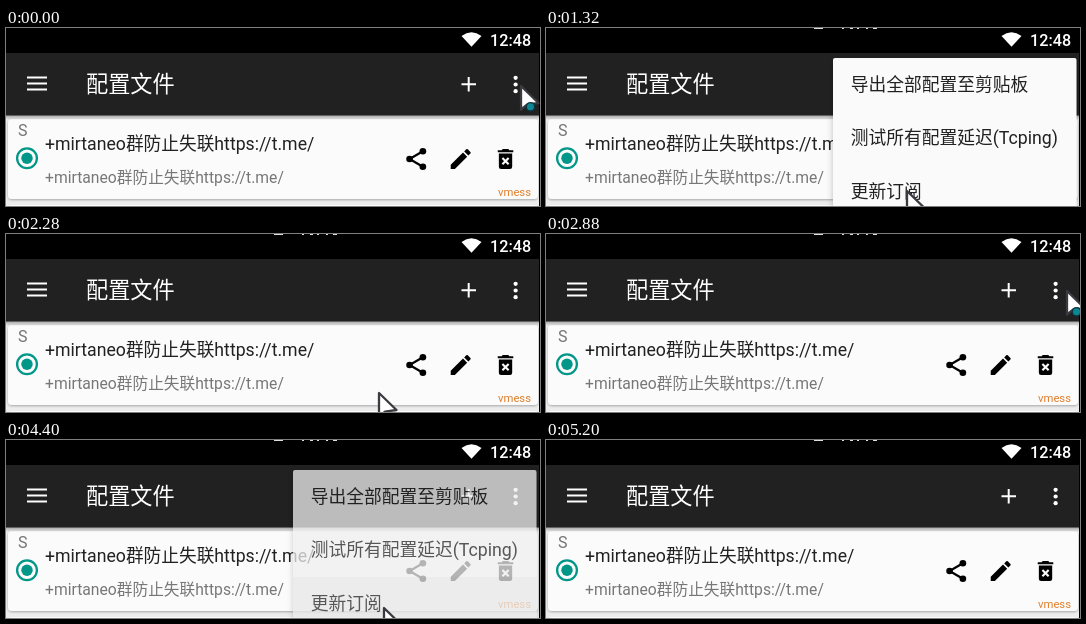
Animation, 534 px wide and 178 px high, one loop 5.64 s. Source, as an HTML page:

```html
<!DOCTYPE html>
<html lang="zh-CN">
<head>
<meta charset="utf-8">
<style>
html, body { margin: 0; width: 100%; height: 100%; overflow: hidden; background: #000; }
svg { display: block; width: 534px; height: 178px; }
text { font-family: Roboto, "Noto Sans CJK SC", "Noto Sans CJK", "Noto Sans CJK JP", sans-serif; white-space: pre; }
</style>
</head>
<body>
<svg viewBox="0 0 534 178" xmlns="http://www.w3.org/2000/svg">
  <defs>
    <linearGradient id="edge" x1="0" y1="0" x2="0" y2="1">
      <stop offset="0" stop-color="#000" stop-opacity=".32"/>
      <stop offset="1" stop-color="#000" stop-opacity="0"/>
    </linearGradient>
    <filter id="soft" x="-10%" y="-10%" width="120%" height="130%">
      <feDropShadow dx="0" dy="1" stdDeviation="1" flood-opacity=".3"/>
    </filter>
    <filter id="deep" x="-10%" y="-10%" width="120%" height="130%">
      <feDropShadow dx="0" dy="3" stdDeviation="3" flood-opacity=".25"/>
    </filter>
    <clipPath id="reveal"><rect id="window"/></clipPath>
  </defs>

  <!-- page and profile card -->
  <rect width="534" height="178" fill="#ececec"/>
  <rect x="2" y="91" width="530" height="80" rx="4" fill="#fbfbfb" filter="url(#soft)"/>
  <rect x="2" y="177" width="530" height="10" rx="4" fill="#fbfbfb"/>
  <text x="12" y="108" font-size="16" fill="#757575">S</text>
  <circle cx="21" cy="130.300" r="9.900" fill="none" stroke="#009688" stroke-width="2.300"/>
  <circle cx="21" cy="130.300" r="5.700" fill="#009688"/>
  <text x="39" y="122" font-size="17.700" fill="#212121">+mirtaneo群防止失联https://t.me/</text>
  <text x="39" y="155" font-size="15.700" fill="#777">+mirtaneo群防止失联https://t.me/</text>
  <text x="492" y="168" font-size="11.300" fill="#e07f2c">vmess</text>

  <g transform="translate(396.900 117.700) scale(1.110)">
    <path d="M18 5 6 12l12 7" fill="none" stroke="#000" stroke-width="2"/>
    <circle cx="18" cy="5" r="3"/><circle cx="6" cy="12" r="3"/><circle cx="18" cy="19" r="3"/>
  </g>
  <path transform="translate(441.400 117.700) scale(1.110)" d="M3 17.250V21h3.750L17.810 9.940l-3.750-3.750zM20.710 7.040a1 1 0 0 0 0-1.410l-2.340-2.340a1 1 0 0 0-1.410 0l-1.830 1.830 3.750 3.750z"/>
  <g transform="translate(486.200 117.700) scale(1.110)">
    <path d="M6 19a2 2 0 0 0 2 2h8a2 2 0 0 0 2-2V7H6zM15.500 4l-1-1h-5l-1 1H5v2h14V4z"/>
    <path d="m9.200 11 5.600 5.800m0-5.800-5.600 5.800" stroke="#fbfbfb" stroke-width="1.900"/>
  </g>

  <!-- toolbar -->
  <rect y="87" width="534" height="5" fill="url(#edge)"/>
  <rect y="25" width="534" height="62.500" fill="#212121"/>
  <path d="M21 49.500h20M21 55.500h20M21 61.500h20" stroke="#fff" stroke-width="2"/>
  <text x="80" y="63.700" font-size="22.200" fill="#fff">配置文件</text>
  <path d="M455.500 56.300h14.500M462.700 49v14.500" stroke="#fff" stroke-width="2"/>
  <g fill="#fff">
    <circle cx="509.600" cy="49.800" r="2.100"/><circle cx="509.600" cy="56.500" r="2.100"/><circle cx="509.600" cy="63.200" r="2.100"/>
  </g>

  <!-- status bar -->
  <rect width="534" height="25" fill="#000"/>
  <path d="M455.500 7.900Q465.500 .6 475.500 7.900L465.500 18.800z" fill="#fff"/>
  <text x="484" y="18" font-size="16.200" font-weight="500" fill="#fff">12:48</text>
  <path id="scrap" d="M268 0h9v1h-9zM296 0h2v1h-2zM304 0h3v1h-3zM311 0h2v1h-2zM320 0h2v1h-2zM327 0h4v1h-4z" fill="#ddd"/>
  <rect x="533" width="1" height="178" fill="#000"/>

  <!-- popup menu -->
  <g id="menu">
    <g clip-path="url(#reveal)">
      <g id="sheet">
        <rect id="paper" x="287" y="30" width="243.500" height="170" rx="2" filter="url(#deep)"/>
        <rect id="press" x="287" y="137" width="243.500" height="53" fill="#000"/>
        <g font-size="17.750" fill="#212121">
          <text x="304.700" y="63">导出全部配置至剪贴板</text>
          <text x="304.700" y="116">测试所有配置延迟(Tcping)</text>
          <text x="304.700" y="169.500">更新订阅</text>
        </g>
      </g>
    </g>
  </g>

  <!-- pointer -->
  <g id="pointer">
    <path d="M0 0V23.500L6 18.700 17.500 17z" fill="#fff" stroke="#3a3a40" stroke-width="2.300" stroke-linejoin="round"/>
    <circle id="busy" cx="9.500" cy="20.800" r="4.200" fill="#0c8793" stroke="#10343c" stroke-width="1.400"/>
  </g>
</svg>
<script>
const LOOP = 5640, STEP = 40;
const $ = id => document.getElementById(id);
const ramp = (t, a, b) => Math.min(1, Math.max(0, (t - a) / (b - a)));
const easeOut = p => 1 - (1 - p) * (1 - p);
const set = (el, attrs) => { for (const k in attrs) el.setAttribute(k, attrs[k]); };
const show = (id, on) => set($(id), { visibility: on ? "visible" : "hidden" });

// pointer tip: time, x, y
const path = [
  [0, 515, 58], [640, 515, 58], [960, 395, 163], [1080, 385, 165],
  [1320, 361, 163], [2240, 361, 163], [2280, 373, 159], [2840, 521, 57],
  [3160, 521, 57], [3480, 395, 163], [3600, 390, 165], [3960, 378, 168],
  [4880, 378, 168], [5040, 390, 186], [LOOP, 390, 186]
];

// when the menu opens, an item is pressed, and it starts to fade
const visits = [
  { open: 520, press: 1600, fade: 1660 },
  { open: 3040, press: 4280, fade: 4340 }
];

function tip(t) {
  let i = 1;
  while (t > path[i][0]) i++;
  const [t0, x0, y0] = path[i - 1], [t1, x1, y1] = path[i];
  const p = ramp(t, t0, t1);
  return [x0 + (x1 - x0) * p, y0 + (y1 - y0) * p];
}

function drawMenu(t) {
  const v = visits.find(v => t >= v.open && t < v.fade + 240);
  show("menu", v);
  if (!v) return;
  const grow = easeOut(ramp(t, v.open, v.open + 240));
  const w = 258 * grow, h = 155 * grow;
  set($("window"), { x: 534 - w, y: 27, width: w, height: h });
  set($("sheet"), { transform: `translate(0 ${-14 * (1 - grow)})` });
  set($("menu"), { opacity: Math.min(grow, 1 - ramp(t, v.fade, v.fade + 240)) });
  set($("paper"), { fill: t > v.fade ? "#f0f0f0" : "#fafafa" });
  set($("press"), { opacity: 0.035 * ramp(t, v.press - STEP, v.press + STEP) });
}

function draw(now) {
  const t = Math.floor((now % LOOP) / STEP) * STEP;
  const [x, y] = tip(t);
  set($("pointer"), { transform: `translate(${x} ${y})` });
  show("busy", x > 510);
  show("scrap", t >= 240);
  drawMenu(t);
}

const start = performance.now();
function tick() {
  draw(performance.now() - start);
  requestAnimationFrame(tick);
}
tick();
</script>
</body>
</html>
```
